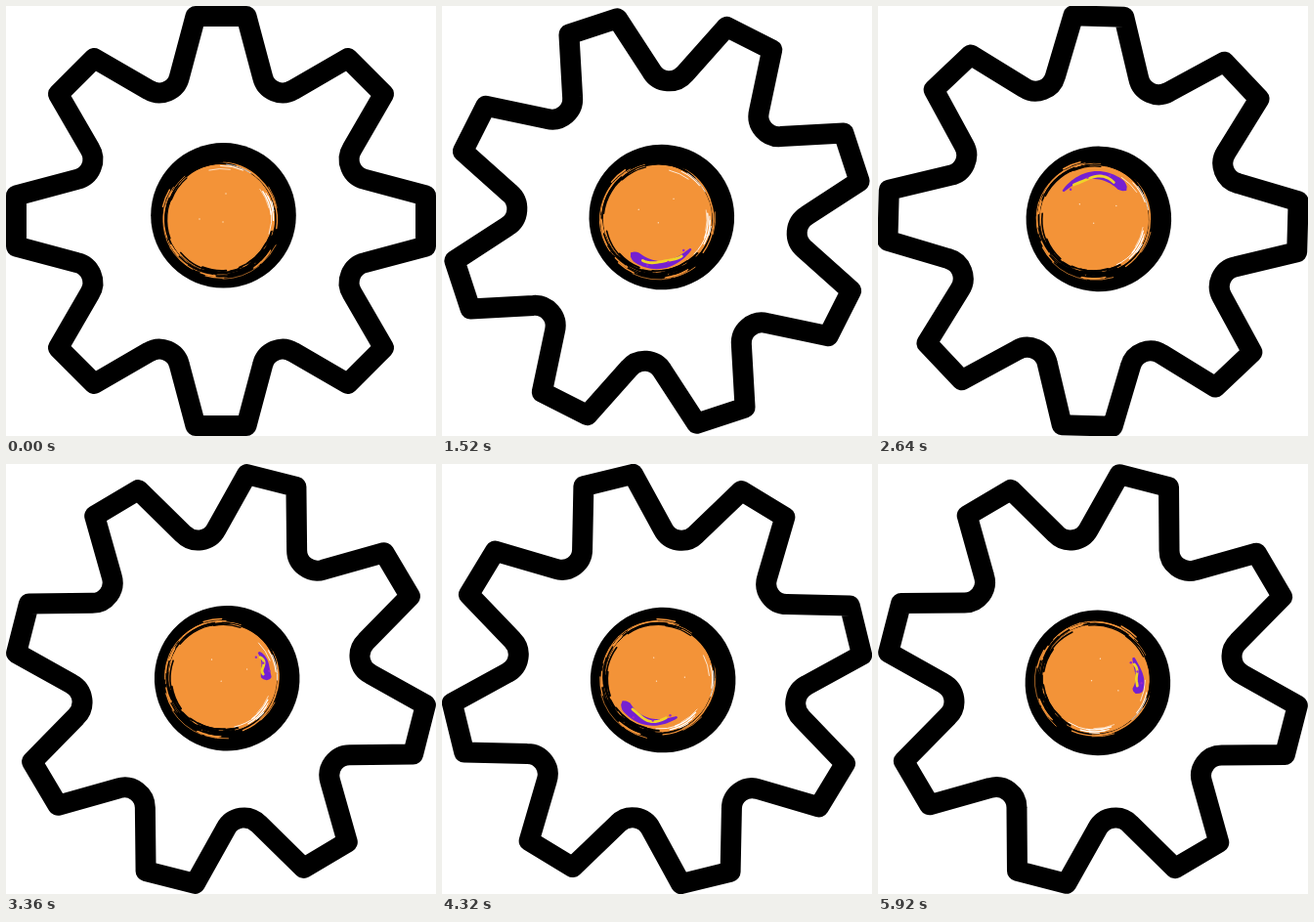
Write an HTML page that moves like this. It is 440 px wide and 440 px high and loops after 6 s.

```html
<!DOCTYPE html>
<html lang="en">
<head>
<meta charset="utf-8">
<title>Turning gear</title>
<style>
  html, body { margin: 0; width: 100%; height: 100%; overflow: hidden; background: #fff; }
  svg { display: block; width: 100vw; height: 100vh; }
</style>
</head>
<body>
<svg viewBox="0 0 440 440">
  <g id="gear" fill="none" stroke-linecap="round">
    <path id="rim" stroke="#000" stroke-width="21" stroke-linejoin="round"/>
    <circle cx="222.5" cy="214.3" r="74.3" fill="#000"/>
    <circle cx="219.5" cy="217.5" r="55.5" fill="#f39338"/>
    <g id="brush"></g>
  </g>
  <path id="body" fill="#7420d2"/>
  <path id="stripe" fill="none" stroke="#f0d428" stroke-width="2.8" stroke-linecap="round" stroke-linejoin="round"/>
  <g id="drops" fill="#9a28c8"></g>
</svg>
<script>
const LOOP = 6000, STEP = 80, DEG_PER_STEP = 360 / 255;
const $ = id => document.getElementById(id);
const rad = deg => deg * Math.PI / 180;

// Angles run clockwise from straight up.
const polar = (cx, cy, r, deg) => [cx + r * Math.sin(rad(deg)), cy - r * Math.cos(rad(deg))];
const fmt = p => p.map(v => v.toFixed(2)).join(' ');
const polyline = points => 'M' + points.map(fmt).join('L');

function add(parent, name, attrs) {
  const el = document.createElementNS('http://www.w3.org/2000/svg', name);
  for (const key in attrs) el.setAttribute(key, attrs[key]);
  parent.appendChild(el);
  return el;
}

function seeded(seed) {
  return () => (seed = (seed * 16807) % 2147483647) / 2147483647;
}

function gearPath() {
  const tooth = [[-42.6, -147.2], [-26, -209.5], [26, -209.5], [42.6, -147.2]];
  const turned = i => {
    const c = Math.cos(rad(i * 45)), s = Math.sin(rad(i * 45));
    return tooth.map(([x, y]) => fmt([220 + x * c - y * s, 220 + x * s + y * c]));
  };
  let d = 'M' + turned(0)[0];
  for (let i = 0; i < 8; i++)
    d += 'L' + turned(i).slice(1).join('L') + 'A21 21 0 0 0 ' + turned(i + 1)[0];
  return d + 'Z';
}

function paintBrush() {
  const rnd = seeded(4217), brush = $('brush');
  const arcs = (count, color, [r0, r1], [from, to], [span0, span1], [w0, w1]) => {
    const pick = (a, b) => a + rnd() * (b - a);
    for (let i = 0; i < count; i++) {
      const cx = 219.5 + pick(-1.5, 1.5), cy = 217.5 + pick(-1.5, 1.5);
      const radius = pick(r0, r1), begin = pick(from, to);
      const a = polar(cx, cy, radius, begin);
      const b = polar(cx, cy, radius, begin + pick(span0, span1));
      add(brush, 'path', {
        d: `M${fmt(a)}A${radius} ${radius} 0 0 1 ${fmt(b)}`,
        stroke: color, 'stroke-width': pick(w0, w1)
      });
    }
  };
  arcs(18, '#f39338', [55, 58.5], [0, 360], [20, 70], [0.6, 1.7]);
  arcs(12, '#f39338', [57, 62], [110, 290], [10, 40], [0.6, 1.8]);
  arcs(22, '#000', [53, 59], [85, 200], [12, 45], [0.6, 2]);
  arcs(10, '#000', [54, 58], [240, 340], [20, 60], [0.5, 1.5]);
  arcs(9, '#fff', [51, 55], [-15, 85], [8, 30], [0.5, 1.4]);
  for (const [x, y] of [[225, 192], [198, 218], [222, 221]])
    add(brush, 'circle', { cx: x, cy: y, r: 0.7, fill: '#ffe2c2' });
}

// step, head angle, tail angle
const track = [
  [0, 36, 36], [10, 93, 54], [19, 221, 132], [33, 407, 312],
  [42, 453, 414], [54, 598, 515], [65, 760, 659], [74, 831, 782]
];

function along(step, column) {
  let i = 0;
  while (i < track.length - 2 && step >= track[i + 1][0]) i++;
  const slope = k => {
    const a = track[Math.max(k - 1, 0)], b = track[Math.min(k + 1, track.length - 1)];
    return (b[column] - a[column]) / (b[0] - a[0]);
  };
  const a = track[i], b = track[i + 1], w = b[0] - a[0], u = (step - a[0]) / w;
  const u2 = u * u, u3 = u2 * u;
  return (2 * u3 - 3 * u2 + 1) * a[column] + (u3 - 2 * u2 + u) * w * slope(i)
    + (3 * u2 - 2 * u3) * b[column] + (u3 - u2) * w * slope(i + 1);
}

function drawWorm(step) {
  const shown = step > 0;
  for (const id of ['body', 'stripe', 'drops']) $(id).style.display = shown ? '' : 'none';
  if (!shown) return;
  const head = along(step, 1), tail = along(step, 2), cx = 222, cy = 219;
  const outer = [], inner = [], stripe = [];
  for (let i = 0; i <= 28; i++) {
    const u = i / 28, deg = tail + (head - tail) * u;
    const half = (1 + 4.8 * Math.pow(u, 0.7)) * Math.sqrt(Math.min(1, (1 - u) * 9));
    const mid = 45 + Math.sin(u * 6 + step * 0.9);
    outer.push(polar(cx, cy, mid + half, deg));
    inner.unshift(polar(cx, cy, mid - half, deg));
    if (u > 0.15 && u < 0.8)
      stripe.push(polar(cx, cy, mid - 2 + Math.sin(u * 10 + step) * 1.5, deg));
  }
  $('body').setAttribute('d', polyline(outer.concat(inner)) + 'Z');
  $('stripe').setAttribute('d', polyline(stripe));
  [...$('drops').children].forEach((drop, i) => {
    const [x, y] = polar(cx, cy, 40 + i * 4, tail + (head - tail) * (0.1 + i * 0.3));
    drop.setAttribute('cx', x);
    drop.setAttribute('cy', y);
  });
}

function render(now) {
  const step = Math.floor((now % LOOP) / STEP);
  $('gear').setAttribute('transform', `rotate(${step * DEG_PER_STEP} 220 220)`);
  drawWorm(step);
}

$('rim').setAttribute('d', gearPath());
paintBrush();
for (let i = 0; i < 3; i++) add($('drops'), 'circle', { r: 1.2 });

const start = performance.now();
function tick() {
  render(performance.now() - start);
  requestAnimationFrame(tick);
}
tick();
</script>
</body>
</html>
```
